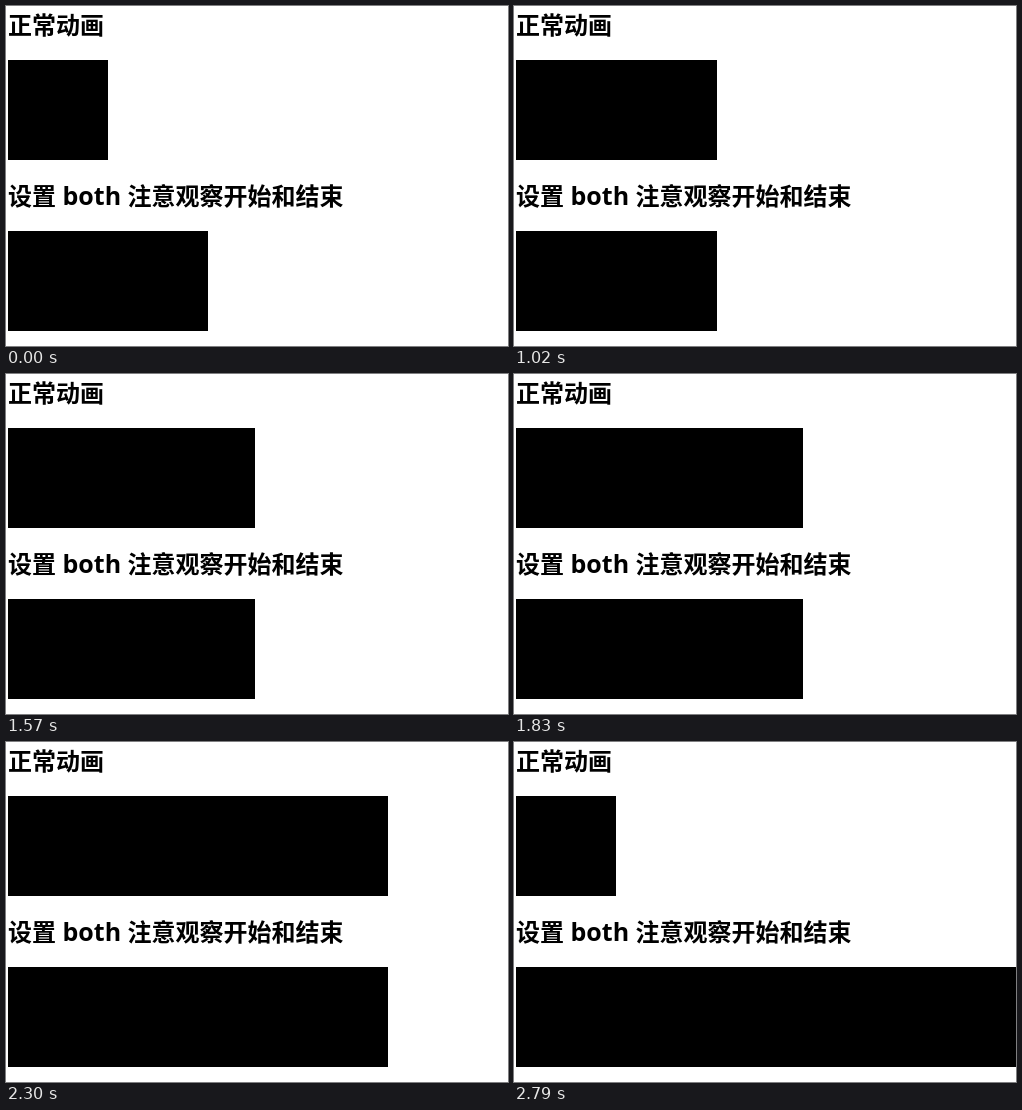
Write an HTML page that moves like this. It is 502 px wide and 340 px high and loops after 4120 ms.

```html
<!DOCTYPE html>
<html lang="zh-CN">
<head>
<meta charset="utf-8">
<style>
html, body { margin: 0; width: 100%; height: 100%; overflow: hidden; background: #fff; }
svg { display: block; }
text { font: bold 24px "Noto Sans CJK SC", "Noto Sans CJK", sans-serif; }
.latin { font: bold 25px "Open Sans", "Noto Sans", sans-serif; }
</style>
</head>
<body>
<svg width="502" height="340" viewBox="0 0 502 340">
  <text x="2" y="28">正常动画</text>
  <rect id="plain" x="2" y="54" width="100" height="100"/>
  <text y="199"><tspan x="2">设置</tspan><tspan class="latin" x="56.5">both</tspan><tspan x="121.5">注意观察开始和结束</tspan></text>
  <rect id="both" x="2" y="225" width="200" height="100"/>
  <path id="cursor" d="M.5 .5V16.5L4.5 13L7 19L9.5 18L7 12H11.5Z" fill="#fff" stroke="#000" visibility="hidden"/>
</svg>
<script>
const LOOP = 4120, START = 964, END = 2788;
const FROM = 200, TO = 500, REST = 100;
// time, x, y of the pointer tip
const pointer = [[750, 407, 334], [800, 425, 320], [830, 443, 318], [860, 460, 328], [890, 0, 400]];
const $ = id => document.getElementById(id);
const plain = $('plain'), both = $('both'), cursor = $('cursor');

// cubic-bezier(.42, 0, 1, 1), solved by bisection
function easeIn(p) {
  let lo = 0, hi = 1;
  for (let i = 0; i < 24; i++) {
    const s = (lo + hi) / 2, r = 1 - s;
    if (1.26 * s * r * r + 3 * s * s * r + s * s * s < p) lo = s;
    else hi = s;
  }
  return lo * lo * (3 - 2 * lo);
}

function draw(t) {
  const p = Math.min(1, Math.max(0, (t - START) / (END - START)));
  const w = Math.round(FROM + (TO - FROM) * easeIn(p));
  both.setAttribute('width', w);
  plain.setAttribute('width', t >= START && t < END ? w : REST);

  const at = pointer.filter(k => k[0] <= t).pop();
  cursor.setAttribute('visibility', at ? 'visible' : 'hidden');
  if (at) cursor.setAttribute('transform', `translate(${at[1]} ${at[2]})`);
}

const t0 = performance.now();
function tick() {
  draw((performance.now() - t0) % LOOP);
  requestAnimationFrame(tick);
}
draw(0);
requestAnimationFrame(tick);
</script>
</body>
</html>
```
